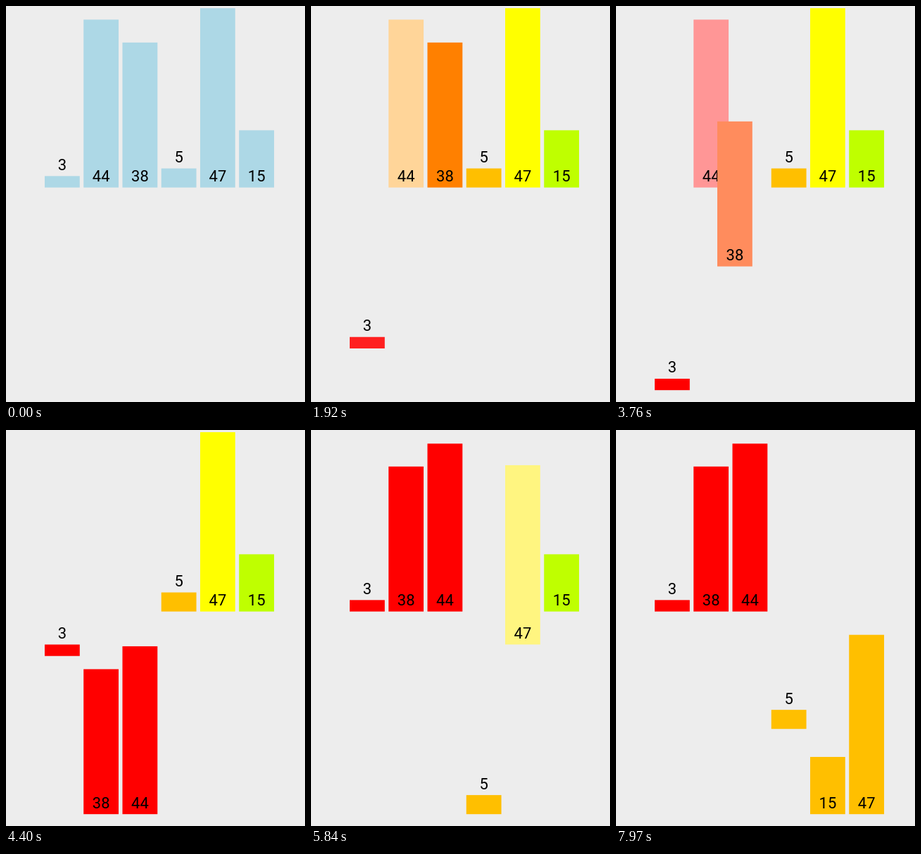
An HTML page with a canvas for the animation above (8 s loop, 425 px wide and 562 px high).

```html
<!DOCTYPE html>
<html lang="en">
<head>
<meta charset="utf-8">
<title>Merge sort</title>
<style>
  html, body { margin: 0; height: 100%; overflow: hidden; background: #ededed; }
  canvas { display: block; width: 425px; height: 562px; }
</style>
</head>
<body>
<canvas id="stage" width="425" height="562"></canvas>
<script>
const ctx = document.getElementById('stage').getContext('2d');
const LOOP = 8000, TICK = 80, MOVE = 250;
const LEFT = 55, PITCH = 55.25, WIDTH = 49.8, UNIT = 5.415, BASE = 257.6, DROP = 287.6;
const VALUES = [3, 44, 38, 5, 47, 15];
const BLUE = 'add8e6', RED = 'ff0000', AMBER = 'ffbf00';

const rgb = hex => [0, 2, 4].map(i => parseInt(hex.slice(i, i + 2), 16));
const mix = (a, b, p) => a + (b - a) * p;
const ease = t => t < 0.5 ? 4 * t ** 3 : 1 - 4 * (1 - t) ** 3;

// Each step: start time and the new properties per bar value.
const paint = (time, colors) => [time, Object.fromEntries(
  Object.entries(colors).map(([value, color]) => [value, { color: rgb(color) }]))];
const down = (time, value, slot, color) => [time, { [value]: { slot, color: rgb(color), low: 1 } }];
const up = (time, value) => [time, { [value]: { low: 0 } }];

const STEPS = [
  paint(1140, { 3: RED, 44: 'ff4000', 38: 'ff8000', 5: AMBER, 47: 'ffff00', 15: 'bfff00' }),

  paint(1440, { 3: 'ff9999', 44: 'ffd599' }),
  down(1763, 3, 0, RED),
  down(2070, 44, 1, RED),
  up(2375, 3),
  up(2680, 44),

  paint(3000, { 3: 'ff9696', 44: 'ff9696', 38: 'ffe699' }),
  down(3335, 3, 0, RED),
  down(3645, 38, 1, RED),
  down(3945, 44, 2, RED),
  up(4245, 3),
  up(4545, 38),
  up(4850, 44),

  paint(5155, { 5: 'ffe599', 47: 'ffff99' }),
  down(5455, 5, 3, AMBER),
  down(5754, 47, 4, AMBER),
  up(6060, 5),
  up(6365, 47),

  paint(6670, { 5: 'ffe599', 47: 'ffea6b', 15: 'ffff94' }),
  down(6973, 5, 3, AMBER),
  down(7275, 15, 4, AMBER),
  down(7590, 47, 5, AMBER),
  up(7802, 5),
];

function barsAt(time) {
  const bars = VALUES.map((value, slot) => ({ value, slot, low: 0, color: rgb(BLUE) }));
  for (const [start, changes] of STEPS) {
    if (time <= start) break;
    const p = ease(Math.min(1, (time - start) / MOVE));
    for (const bar of bars) {
      const goal = changes[bar.value];
      if (!goal) continue;
      for (const key in goal) {
        bar[key] = key === 'color'
          ? bar.color.map((c, i) => mix(c, goal.color[i], p))
          : mix(bar[key], goal[key], p);
      }
    }
  }
  return bars;
}

function drawBar({ value, slot, low, color }) {
  const x = LEFT + slot * PITCH, bottom = BASE + low * DROP, height = value * UNIT;
  ctx.fillStyle = `rgb(${color.map(Math.round)})`;
  ctx.fillRect(x, bottom - height, WIDTH, height);
  ctx.fillStyle = '#000';
  ctx.fillText(value, x + WIDTH / 2, bottom - 8.6 - (value < 10 ? height : 0));
}

function draw() {
  const time = Math.floor(performance.now() % LOOP / TICK) * TICK;
  ctx.fillStyle = '#ededed';
  ctx.fillRect(0, 0, 425, 562);
  ctx.font = '22px Roboto, sans-serif';
  ctx.textAlign = 'center';
  barsAt(time).forEach(drawBar);
  requestAnimationFrame(draw);
}
draw();
</script>
</body>
</html>
```
